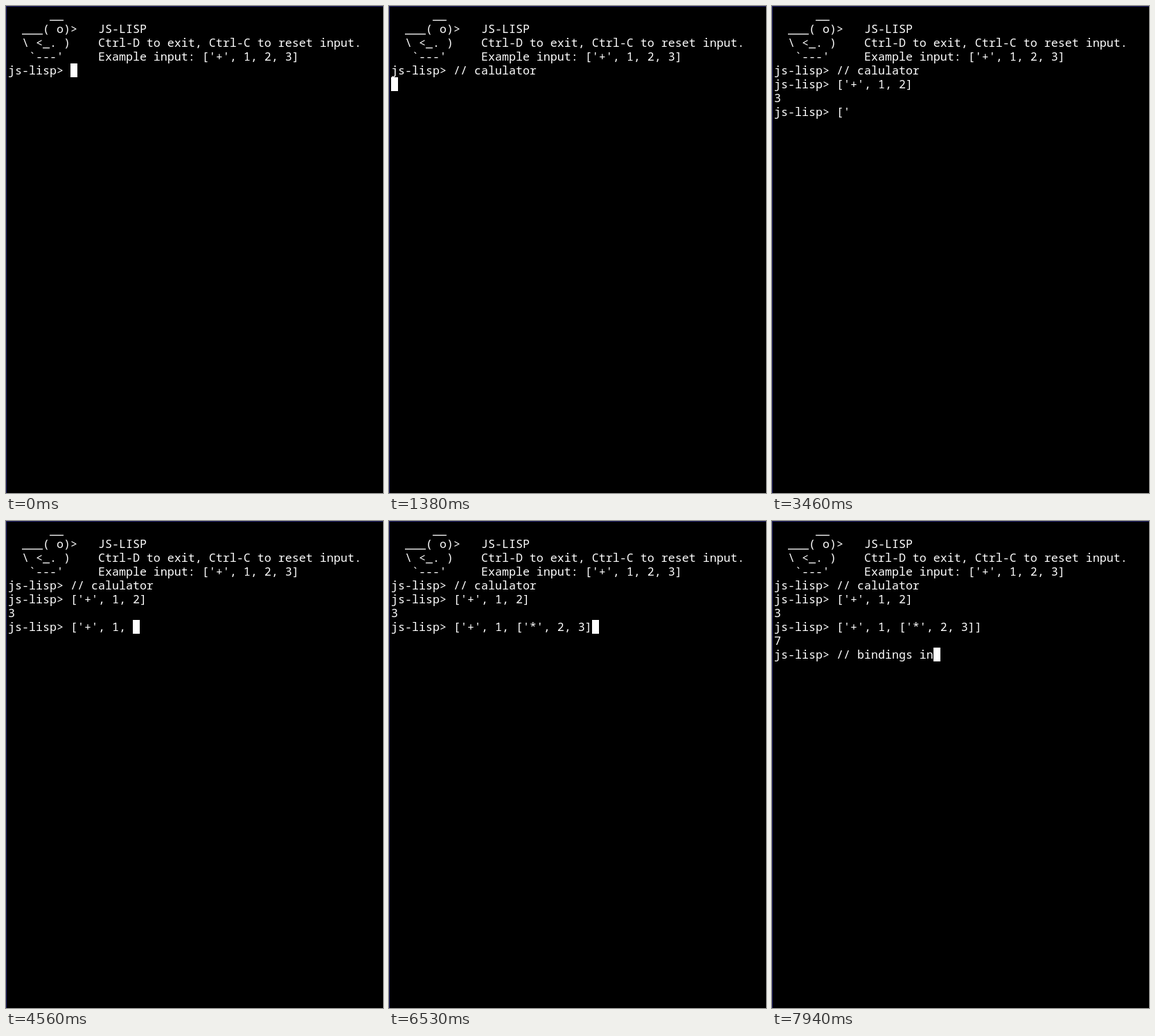
Write an HTML page that moves like this. It is 544 by 704 pixels and loops after 8 s.

```html
<!DOCTYPE html>
<html lang="en">
<head>
<meta charset="utf-8">
<title>js-lisp session</title>
<style>
  html, body { margin: 0; width: 100%; height: 100%; overflow: hidden; background: #000; }
  body { position: relative; }
  #edge { position: absolute; inset: 0; border: solid #23236b; border-width: 1px 0 0 1px; }
  pre {
    position: absolute; left: 3px; margin: 0; color: #fff;
    font: 16.6667px/20px "Noto Sans Mono", "DejaVu Sans Mono", monospace;
    font-variant-ligatures: none;
  }
  #banner { top: 3px; }
  #session { top: 83px; }
  #cursor { position: absolute; width: 10px; height: 20px; background: #fff; }
</style>
</head>
<body>
<div id="edge"></div>
<pre id="banner">      __
  ___( o)&gt;   JS-LISP
  \ &lt;_. )    Ctrl-D to exit, Ctrl-C to reset input.
   `---'     Example input: ['+', 1, 2, 3]</pre>
<pre id="session"></pre>
<div id="cursor"></div>
<script>
const LOOP = 8000;
const PROMPT = 'js-lisp> ';

// Keys that print more than themselves; "~" hides the cursor for one step.
const output = { '>': PROMPT, '#': '3\n' + PROMPT, '$': '7\n' + PROMPT, '~': '' };

// Bursts of keys, evenly spaced: first time, last time, keys
const bursts = [
  [500, 930, '/~/ ~cal'],
  [970, 1500, 'culator\n>['],
  [1670, 2210, "'~+', "],
  [2340, 2710, '1,~ 2'],
  [2880, 2880, ']'],
  [3190, 3460, "\n#['~"],
  [3500, 4130, "+', 1"],
  [4290, 4290, ','],
  [4560, 5590, " [~'*~', "],
  [5760, 6790, '2, ~3]]\n$'],
  [6910, 7230, '/~/ ~b'],
  [7270, 7560, 'indings'],
  [7840, 7940, ' in']
];
// The last letter of "cal" is already on screen when the next burst starts.
bursts[1][2] = bursts[1][2].slice(1);

const steps = bursts.flatMap(([from, to, keys]) =>
  [...keys].map((key, i) => ({
    at: from + (to - from) * i / Math.max(1, keys.length - 1),
    key
  })));

const session = document.getElementById('session');
const cursor = document.getElementById('cursor');

function draw(time) {
  let text = PROMPT, visible = true;
  for (const { at, key } of steps) {
    if (at > time + 0.01) break;
    text += output[key] ?? key;
    visible = key !== '~';
  }
  if (session.textContent !== text) session.textContent = text;

  const lines = text.split('\n');
  cursor.style.left = 3 + 10 * lines.at(-1).length + 'px';
  cursor.style.top = 83 + 20 * (lines.length - 1) + 'px';
  cursor.style.visibility = visible ? 'visible' : 'hidden';
}

const start = performance.now();
function tick() {
  draw((performance.now() - start) % LOOP);
  requestAnimationFrame(tick);
}
tick();
</script>
</body>
</html>
```
